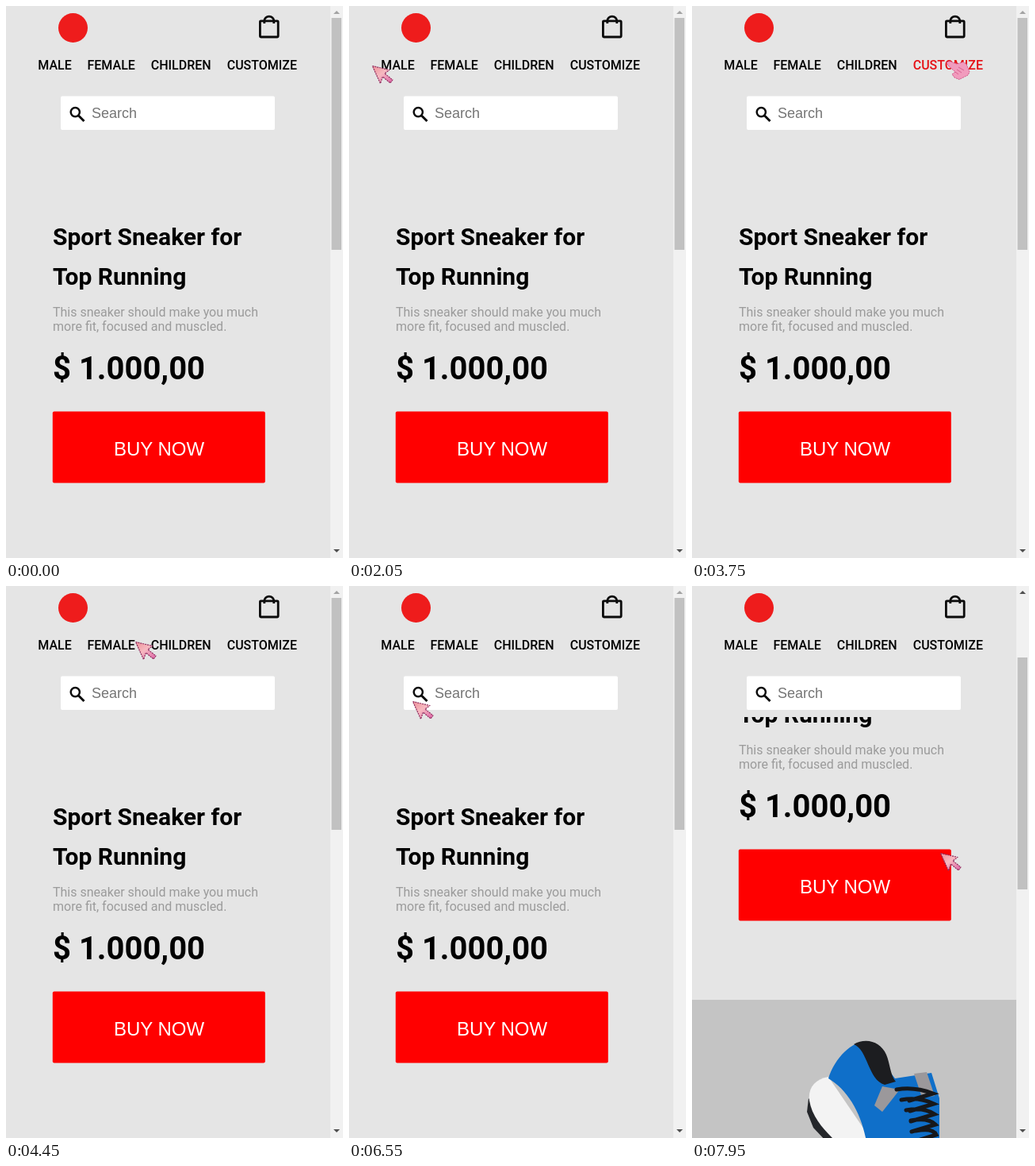
These frames come from a looping animation (425x695 px, 8 s). An HTML page:

```html
<!DOCTYPE html>
<html lang="en">
<head>
<meta charset="utf-8">
<title>Sneaker shop</title>
<style>
  html, body { margin: 0; width: 425px; height: 695px; overflow: hidden; background: #e5e5e5; }
  svg { display: block; font-family: Roboto, sans-serif; }
  .nav text { font-size: 16px; font-weight: 500; }
  .nav .on { fill: #e60f14; }
  .title { font-size: 30px; font-weight: 700; }
  .note { font-size: 16px; fill: #9b9b9b; }
  .price { font-size: 40px; font-weight: 700; }
  .form { font-family: "Liberation Sans", Arial, sans-serif; }
</style>
</head>
<body>
<svg width="425" height="695" viewBox="0 0 425 695">
  <defs>
    <linearGradient id="pink" x1="0" y1="0" x2="1" y2="1">
      <stop offset="0" stop-color="#ee8f98"/>
      <stop offset=".45" stop-color="#f6b9c0"/>
      <stop offset="1" stop-color="#dd5fa6"/>
    </linearGradient>
  </defs>
  <rect width="425" height="695" fill="#e5e5e5"/>

  <g id="page">
    <text class="title" x="59" y="301">Sport Sneaker for</text>
    <text class="title" x="59" y="351">Top Running</text>
    <text class="note" x="59" y="390.5">This sneaker should make you much</text>
    <text class="note" x="59" y="409">more fit, focused and muscled.</text>
    <text class="price" x="59" y="470">$ 1.000,00</text>
    <rect x="58.8" y="510.5" width="268" height="90" rx="2" fill="#f00"/>
    <text class="form" x="193" y="565.5" font-size="24" fill="#fff" text-anchor="middle">BUY NOW</text>
    <rect y="700" width="409" height="700" fill="#c4c4c4"/>
    <g transform="translate(0 179)">
      <path fill="#24262a" d="M147 645L145 662L153 682L170 700H196Z"/>
      <path fill="#f3f3f3" d="M172 618C155 621 146 632 148 648C152 670 166 684 182 700H228Z"/>
      <path fill="#0f6fc9" d="M172 620C180 594 202 573 220 573L256 620L302 613L312 645V700H220C214 664 196 634 172 620Z"/>
      <path fill="#1c1d20" d="M204 577C220 568 238 574 245 590C250 602 250 616 257 624L243 628C222 622 222 584 204 577Z"/>
      <path fill="#9b989b" d="M280 614L296 612L306 642L290 644ZM240 630L262 634L240 662L230 654Z"/>
      <path id="laces" fill="none" stroke="#17181b" stroke-width="5" stroke-linecap="round"/>
    </g>
  </g>

  <rect width="409" height="165" fill="#e5e5e5"/>
  <circle cx="84.5" cy="27.5" r="18.5" fill="#ee1c1c"/>
  <g fill="none" stroke="#0b0b0b" stroke-width="2.8">
    <rect x="320.4" y="18.8" width="22.8" height="20.2" rx="1"/>
    <path d="M325.8 22V18.8a6 5.6 0 0 1 12 0V22"/>
  </g>
  <g class="nav">
    <text x="40.3" y="80">MALE</text>
    <text x="102.5" y="80">FEMALE</text>
    <text x="182.7" y="80">CHILDREN</text>
    <text x="278.7" y="80">CUSTOMIZE</text>
  </g>
  <rect x="69" y="113.5" width="270" height="42.5" rx="2" fill="#fff"/>
  <g fill="none" stroke="#0b0b0b">
    <circle cx="87.3" cy="133.6" r="5.6" stroke-width="2.5"/>
    <path d="M91.5 138L98.5 145" stroke-width="3"/>
  </g>
  <text class="form" x="108" y="140.5" font-size="18" fill="#757575">Search</text>

  <rect x="409" width="16" height="695" fill="#f1f1f1"/>
  <rect id="thumb" x="410.5" y="15" width="12.5" height="292" fill="#c1c1c1"/>
  <path id="up" d="M413 10l4-4 4 4z"/>
  <path d="M413 684l4 4 4-4z" fill="#505050"/>

  <g id="cursor" stroke-linejoin="round">
    <path id="arrow" fill="url(#pink)" stroke="#8e2a5c" stroke-width="1.2" stroke-dasharray="2 1"
      d="M.5 .5L22 5.5L16 10L26 18L23 22L13.5 14L10.500 22.500Z"/>
    <g id="hand">
      <path fill="#f19bbd" stroke="#cf5285" stroke-dasharray="2 1"
        d="M0 2L4 .5L13 4L21 1.500L25 4L29 14L27 18L16 23.500L10 21L7 17L11 14L2 6Z"/>
      <path fill="none" stroke="#d8608f" d="M11 14l4 3M13 11l6 4M15 8l7 4"/>
    </g>
  </g>
</svg>
<script>
  const LOOP = 8000, STEP = 50;
  const $ = id => document.getElementById(id);
  const page = $('page'), thumb = $('thumb'), up = $('up');
  const cursor = $('cursor'), arrow = $('arrow'), hand = $('hand');
  const links = [...document.querySelectorAll('.nav text')];

  let lace = '';
  for (let i = 0; i < 5; i++) lace += `M${258 + 6 * i} ${634 + 13 * i}q22 -4 ${46 - 5 * i} 5l-30 9`;
  $('laces').setAttribute('d', lace);

  // Pointer moves: rest points joined by straight lines or, with a bend, by curves
  const first = { x: 339, y: 255 };
  const moves = [
    { start: 1000, end: 1800, x: 47, y: 31 },
    { start: 1850, end: 2700, x: 129, y: 58, bend: { x: -15, y: 119 } },
    { start: 2700, end: 3300, x: 337, y: 69, bend: { x: 280, y: 48 } },
    { start: 3700, end: 4550, x: 160, y: 70 },
    { start: 4550, end: 5200, x: 69, y: 71, bend: { x: 130, y: 88 } },
    { start: 5450, end: 5650, x: 43, y: 66, bend: { x: 206, y: 170 } },
    { start: 5800, end: 6000, x: 316, y: 135 },
    { start: 6100, end: 6950, x: 2, y: 121, bend: { x: 150, y: 180 } },
    { start: 6950, end: 7250, x: 271, y: 280 },
    { start: 7450, end: 7550, x: 317, y: 329 },
    { start: 7600, end: 7950, x: 313, y: 336 }
  ];

  const progress = (t, start, end) => Math.min(1, Math.max(0, (t - start) / (end - start)));
  const easeOut = u => Math.sin(u * Math.PI / 2);
  const easeInOut = u => u < .5 ? 4 * u ** 3 : 1 - 4 * (1 - u) ** 3;

  function pointer(t) {
    let from = first;
    for (const to of moves) {
      if (t < to.start) break;
      const u = easeOut(progress(t, to.start, to.end)), v = 1 - u;
      const along = axis => {
        const bend = to.bend ? to.bend[axis] : (from[axis] + to[axis]) / 2;
        return v * v * from[axis] + 2 * u * v * bend + u * u * to[axis];
      };
      if (u === 1) from = to;
      else return { x: along('x'), y: along('y') };
    }
    return from;
  }

  function draw(t) {
    const { x, y } = pointer(t);
    const shown = t >= moves[0].start;
    let over = false;
    for (const link of links) {
      const left = +link.getAttribute('x'), right = left + link.getComputedTextLength();
      const hit = shown && x >= left && x <= right && y >= 64 && y <= 82;
      link.classList.toggle('on', hit);
      over = over || hit;
    }
    cursor.setAttribute('visibility', shown ? 'visible' : 'hidden');
    cursor.setAttribute('transform', `translate(${Math.round(x)} ${Math.round(y)})`);
    arrow.style.display = over ? 'none' : '';
    hand.style.display = over ? '' : 'none';

    const top = Math.round(179 * easeInOut(progress(t, 7545, 7950)));
    page.setAttribute('transform', `translate(0 ${-top})`);
    thumb.setAttribute('y', 15 + Math.round(top * .42));
    up.setAttribute('fill', top ? '#505050' : '#a3a3a3');
  }

  const start = performance.now();
  function tick() {
    const t = (performance.now() - start) % LOOP;
    draw(Math.floor(t / STEP) * STEP);
    requestAnimationFrame(tick);
  }
  tick();
</script>
</body>
</html>
```
